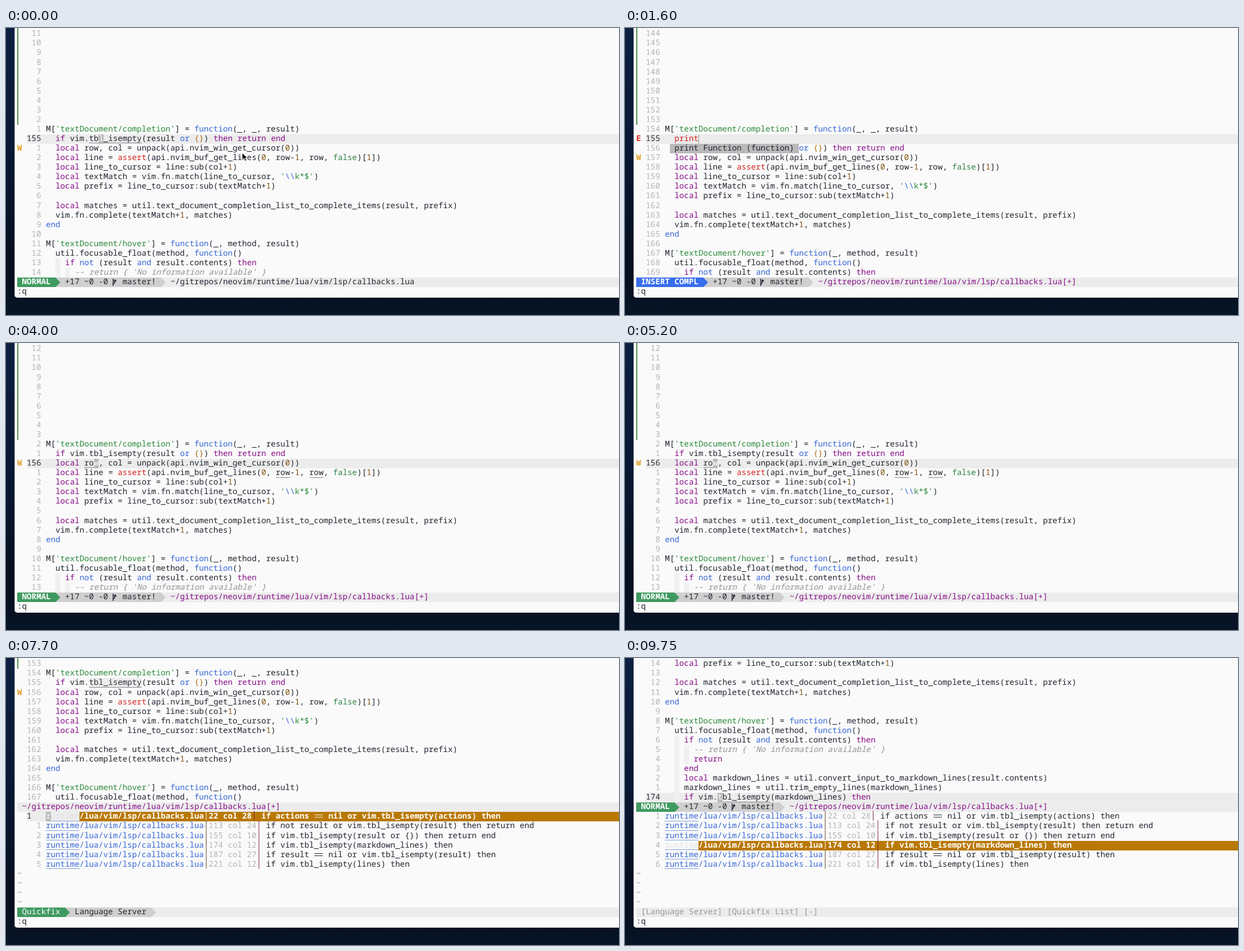
Write an HTML page that moves like this. It is 1093 px wide and 513 px high and loops after 9800 ms.

```html
<!DOCTYPE html>
<html lang="en">
<head>
<meta charset="utf-8">
<title>Editor session</title>
<style>
html, body { margin: 0; width: 100%; height: 100%; overflow: hidden; }
body { position: relative; background: linear-gradient(#0d2042, #081732 45%, #050e1d 85%, #071527); }
#window { position: absolute; left: 15px; top: 0; right: 0; height: 482px; background: #fafafa; border-radius: 0 0 0 5px; overflow: hidden; box-shadow: inset 1px 0 #a4a9b1; }
#screen { position: absolute; left: 5px; top: 2.3px; right: 0; bottom: 0;
  font: 14.23px/16.5px "Noto Sans Mono", "DejaVu Sans Mono", monospace;
  font-variant-ligatures: none; text-rendering: geometricPrecision; color: #20252f; }
.row { position: absolute; left: 0; right: 0; height: 17.07px; white-space: pre; }
.cell { position: absolute; top: 0; height: 17.07px; }
.band { right: 0; background: #ececec; }
.orange { background: #b97800; }
.status { background: #ececec; }
.changed::before { content: ""; position: absolute; left: 0; top: -2.3px; width: 2px; height: 19.4px; background: #4d8f4b; }
.nr, .dim { color: #b3b3b3; }
.here { color: #262b35; }
.warn { color: #e0a02c; font-weight: 600; }
.error, .red { color: #d5221d; }
.error { font-weight: 600; }
.comment { color: #939393; font-style: italic; }
.string { color: #2c8a3c; }
.bool { color: #2f7f45; }
.key, .modified { color: #870d87; }
.op, .path { color: #3566d6; }
.num { color: #7d5310; }
.brace { color: #b0701a; }
.bar { color: #5f4320; }
.bar.end { color: #7a2440; }
.guide { background: #f0f0f0; }
.word { border-bottom: 1px solid #858585; box-sizing: border-box; height: 16.3px; }
.word.ref { background: #8882; }
.link { border-color: #7f9fe0; }
.cursor { background: #b9b9b9; color: #fff; }
.cursor.thin { background: #9a9a9a; }
.popup { background: #bababa; }
.picked, .picked span { color: #fff; font-weight: 600; }
.picked .faint { color: #e3e3e3; font-weight: 400; }
.chevron { clip-path: polygon(0 0, calc(100% - 8.535px) 0, 100% 50%, calc(100% - 8.535px) 100%, 0 100%); }
.grey { background: #cfcfcf; }
.NORMAL, .INSERT { color: #fff; font-weight: 700; }
.NORMAL, .quick { background: #3f9a60; color: #fff; }
.INSERT { background: #386ded; }
.inactive { color: #969696; }
.eq { color: transparent; background: linear-gradient(#20252f, #20252f) 1px 7px / 15px 1.2px no-repeat, linear-gradient(#20252f, #20252f) 1px 11px / 15px 1.2px no-repeat; }
.picked .eq { color: transparent; background-image: linear-gradient(#fff, #fff), linear-gradient(#fff, #fff); }
svg { position: absolute; overflow: visible; }
</style>
</head>
<body>
<div id="window"><div id="screen"></div></div>
<script>
const CELL = 8.538, ROW = 17.07, LOOP = 9800;
const TEXT = 6, FIRST = 154, STATUS_ROW = 26;
const FILE = '~/gitrepos/neovim/runtime/lua/vim/lsp/callbacks.lua';

const CODE = String.raw`M['textDocument/completion'] = function(_, _, result)
  if vim.tbl_isempty(result or {}) then return end
  local row, col = unpack(api.nvim_win_get_cursor(0))
  local line = assert(api.nvim_buf_get_lines(0, row-1, row, false)[1])
  local line_to_cursor = line:sub(col+1)
  local textMatch = vim.fn.match(line_to_cursor, '\\k*$')
  local prefix = line_to_cursor:sub(textMatch+1)

  local matches = util.text_document_completion_list_to_complete_items(result, prefix)
  vim.fn.complete(textMatch+1, matches)
end

M['textDocument/hover'] = function(_, method, result)
  util.focusable_float(method, function()
    if not (result and result.contents) then
      -- return { 'No information available' }
      return
    end
    local markdown_lines = util.convert_input_to_markdown_lines(result.contents)
    markdown_lines = util.trim_empty_lines(markdown_lines)
    if vim.tbl_isempty(markdown_lines) then`.split('\n');

const REFERENCES = [
  ['22 col 28', 'if actions == nil or vim.tbl_isempty(actions) then'],
  ['113 col 24', 'if not result or vim.tbl_isempty(result) then return end'],
  ['155 col 10', 'if vim.tbl_isempty(result or {}) then return end'],
  ['174 col 12', 'if vim.tbl_isempty(markdown_lines) then'],
  ['187 col 27', 'if result == nil or vim.tbl_isempty(result) then'],
  ['221 col 12', 'if vim.tbl_isempty(lines) then'],
];

// Each step changes only the listed fields of the editor state.
const STEPS = [
  [0, { top: 144, height: 26, mode: 'NORMAL', line: 155, col: 11, word: 'tbl_isempty', relative: true, pointer: true }],
  [500, { mode: 'INSERT', typed: '', col: 2, word: '', relative: false, modified: true, pointer: false }],
  ...[...'print'].map((_, i) => [850 + i * 100, { typed: 'print'.slice(0, i + 1), col: 3 + i }]),
  [1400, { mode: 'INSERT COMPL', popup: true }],
  [1500, { error: true }],
  [1900, { popup: false, relative: true, block: true }],
  [3100, { mode: 'NORMAL', typed: undefined, error: false, col: 2 }],
  [3500, { line: 156 }],
  [3650, { col: 8, word: 'row' }],
  [3850, { col: 10 }],
  [5400, { line: 155, word: 'tbl_isempty' }],
  [7350, { top: 153, height: 15, list: 1, picked: 1 }],
  [8200, { list: 2 }],
  [8350, { list: 3 }],
  [8500, { list: 4 }],
  [8800, { list: 0, picked: 4, top: 160, line: 174, col: 11 }],
];
let latest = {};
const SCENES = STEPS.map(([time, change]) => ({ time, state: latest = { ...latest, ...change } }));

const span = (cls, text) => `<span class="${cls}">${text}</span>`;
const row = (index, html, cls = '') => `<div class="row ${cls}" style="top:${index * ROW}px">${html}</div>`;
const cell = (col, width, cls, text = '') =>
  `<span class="cell ${cls}" style="left:${col * CELL}px;${width ? `width:${width * CELL}px` : ''}">${text}</span>`;
const chevron = (start, text, cls) =>
  cell(0, start + text.length + 1, 'chevron ' + cls, ' '.repeat(start) + text);

const TOKENS = /(?<comment>--.*)|(?<string>'[^']*')|(?<op>^end\b|\b(?:function|not|and|or)\b)|(?<key>\b(?:local|if|then|return|end)\b)|(?<red>\b(?:assert|print)\b)|(?<bool>\bfalse\b)|(?<num>\b\d+\b)|(?<brace>[{}])/g;

function highlight(text) {
  return text.replace(TOKENS, (token, ...rest) => {
    const groups = rest.at(-1);
    const cls = Object.keys(groups).find(name => groups[name]);
    return span(cls, token.replace('\\\\', span('op', '\\\\')));
  });
}

function numberCell(number, current, relative) {
  if (number === current) return cell(2, 0, 'here', number);
  const shown = relative ? Math.abs(number - current) : number;
  return cell(2, 0, 'nr', String(shown).padStart(3));
}

function cursorCell(col, text, thin) {
  return thin ? cell(TEXT + col, .15, 'cursor thin') : cell(TEXT + col, 1, 'cursor', text[col] || '');
}

function codeRow(s, index, lines) {
  const number = s.top + index;
  const text = lines[number - FIRST] || '';
  const current = number === s.line && !s.list;
  let html = current ? cell(2, 0, 'band') : '';
  const indent = text.search(/\S/);
  for (let col = 2; col < indent; col += 2) html += cell(TEXT + col, 1, 'guide');
  if (text.startsWith('  local row')) html += cell(0, 0, 'warn', 'W');
  if (s.error && number === s.line) html += cell(0, 0, 'error', 'E');
  html += numberCell(number, s.list ? 0 : s.line, s.relative && !s.list);
  html += cell(TEXT, 0, '', highlight(text));
  if (s.word) {
    for (const match of text.matchAll(new RegExp(`\\b${s.word}\\b`, 'g')))
      html += cell(TEXT + match.index, s.word.length, s.list ? 'word ref' : 'word');
  }
  if (current) html += cursorCell(s.col, text, s.mode !== 'NORMAL' && !s.block);
  return row(index, html, number < FIRST ? 'changed' : '');
}

const branchIcon = col => `<svg width="7" height="15" style="left:${col * CELL}px;top:1px" fill="none" stroke="#20252f" stroke-width="1.5"><path d="M2 1V14M2 11Q5.5 9 5.5 4M3.5 6L5.5 3L7.5 6"/></svg>`;

function mainStatus(s) {
  const file = FILE + (s.modified ? '[+]' : '');
  const color = s.modified ? 'modified' : '';
  if (s.list) return cell(1, 0, color, file);
  const mode = ` ${s.mode} `;
  const start = mode.length + 1;
  const branch = ' +17 ~0 -0   master! ';
  return chevron(start, branch, 'grey')
    + chevron(0, mode, s.mode.split(' ')[0])
    + branchIcon(start + 10.8)
    + cell(start + branch.length + 2, 0, color, file);
}

function referenceRow(s, index) {
  const [place, text] = REFERENCES[index];
  const number = index + 1, picked = number === s.picked, current = number === s.list;
  let html = current ? cell(2, 0, 'band') : '';
  if (picked) html += cell(TEXT + 7, 0, 'band orange');
  html += numberCell(number, s.list, !!s.list);
  const content = span('path faint', 'runtime') + span('path', '/lua/vim/lsp/callbacks.lua')
    + span('bar', '│') + span('dim', place) + span('bar end', '│')
    + ' ' + text.replace('==', span('eq', '=='));
  html += cell(TEXT, 0, picked ? 'picked' : '', content) + cell(TEXT, 7, 'word link');
  if (current) html += cursorCell(0, 'runtime');
  return row(s.height + 1 + index, html);
}

function quickfix(s) {
  let html = REFERENCES.map((_, i) => referenceRow(s, i)).join('');
  for (let i = s.height + 1 + REFERENCES.length; i < STATUS_ROW; i++) html += row(i, span('inactive', '~'));
  const status = s.list
    ? chevron(11, ' Language Server ', 'grey') + chevron(0, ' Quickfix ', 'quick')
    : cell(1, 0, 'inactive', '[Language Server] [Quickfix List] [-]');
  return html + row(STATUS_ROW, status, 'status');
}

const POINTER = '<svg width="12" height="18" style="left:399.5px;top:220px"><path d="M1 1V14L4.2 11.2L6.3 16L8.6 15L6.5 10.4H10.8Z" fill="#111" stroke="#fff"/></svg>';

function render(s) {
  const lines = [...CODE];
  if (s.typed !== undefined) lines.splice(1, 0, '  ' + s.typed);
  let html = '';
  for (let i = 0; i < s.height; i++) html += codeRow(s, i, lines);
  html += row(s.height, mainStatus(s), 'status');
  if (s.picked) html += quickfix(s);
  if (s.popup) html += row(s.line + 1 - s.top, cell(TEXT + 1, 27, 'popup', ' print Function (function) '));
  html += row(STATUS_ROW + 1, ':q');
  return html + (s.pointer ? POINTER : '');
}

const screenBox = document.getElementById('screen');
let shown;
function tick() {
  const time = performance.now() % LOOP;
  const scene = SCENES.findLast(step => step.time <= time);
  if (scene !== shown) screenBox.innerHTML = render((shown = scene).state);
  requestAnimationFrame(tick);
}
tick();
</script>
</body>
</html>
```
